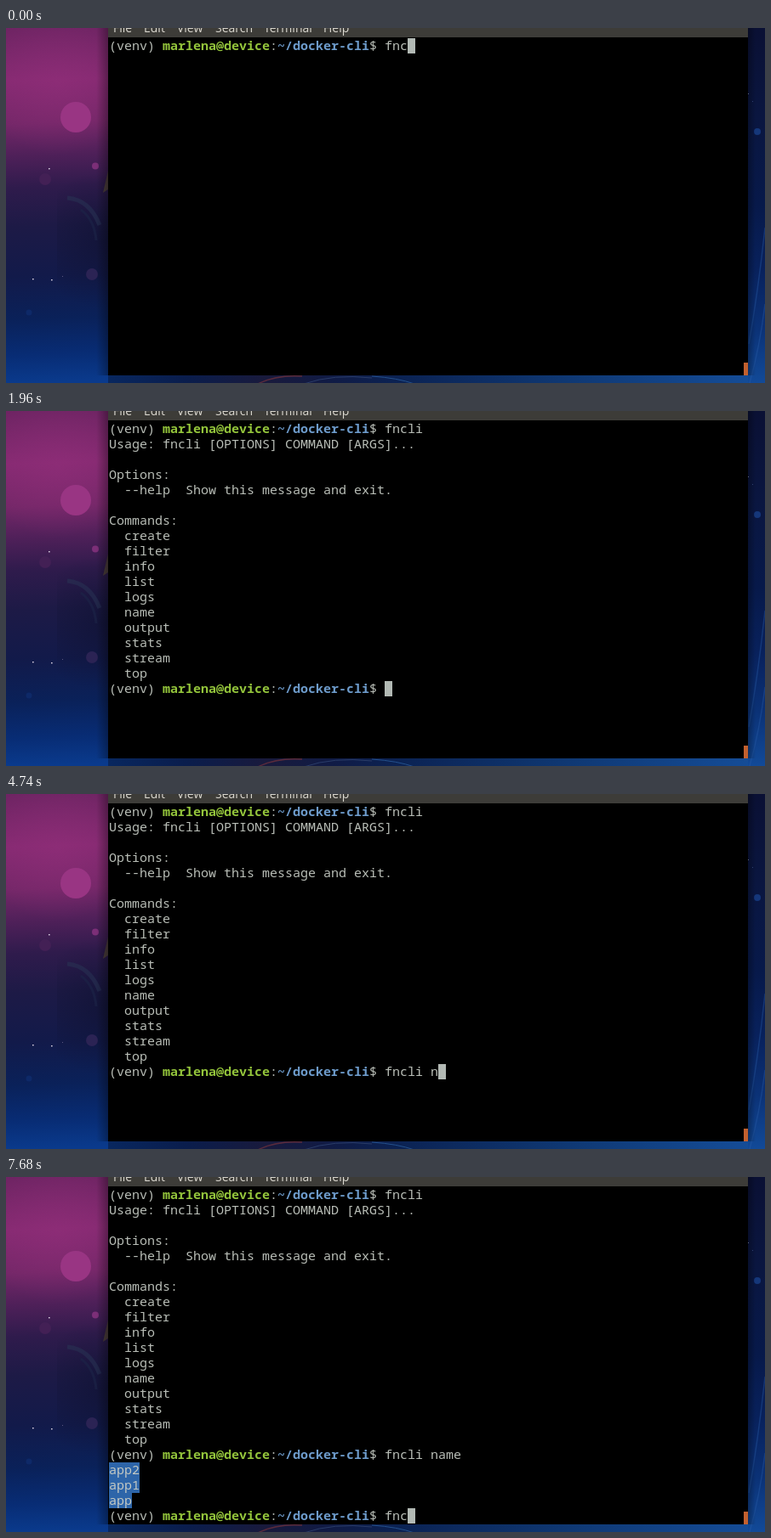
An HTML page with a canvas that plays this animation: 892 by 418 pixels, repeating every 8 s.

```html
<!DOCTYPE html>
<html lang="en">
<head>
<meta charset="utf-8">
<title>Terminal session</title>
<style>
  html, body { margin: 0; width: 100%; height: 100%; overflow: hidden; background: #000; }
  canvas { display: block; }
</style>
</head>
<body>
<canvas id="stage" width="892" height="418"></canvas>
<script>
const W = 892, H = 418, LOOP = 8000;
const LEFT = 121, TOP = 12, CELL = 9, LINE = 18;
const TEXT = '#b9beb7', GREEN = '#93c43b', BLUE = '#6d9bcb', CURSOR = '#b2b9b4';
const MONO = '15px "Noto Sans Mono", monospace';

const ctx = document.getElementById('stage').getContext('2d');

const HELP = [
  'Usage: fncli [OPTIONS] COMMAND [ARGS]...', '',
  'Options:', '  --help  Show this message and exit.', '',
  'Commands:',
  ...'create filter info list logs name output stats stream top'.split(' ').map(c => '  ' + c)
];
const APPS = ['app2', 'app1', 'app'];
const HELP_AT = 1190, APPS_AT = 6050;

const PROMPT = [
  ['(venv) ', TEXT], ['marlena@device', GREEN, true], [':', TEXT],
  ['~/docker-cli', BLUE, true], ['$ ', TEXT]
];
const PROMPT_LEN = PROMPT.reduce((n, part) => n + part[0].length, 0);

// Each prompt: row, time it appears, and the typed text from each time on
const PROMPTS = [
  { row: 0, at: 0, keys: [[0, 'fnc'], [180, 'fncli ']] },
  { row: 17, at: 1260, keys: [
    [2280, 'f'], [3310, 'fn'], [3540, 'fnc'], [3770, 'fncli '],
    [4730, 'fncli n'], [4800, 'fncli na'], [4880, 'fncli nam'], [5030, 'fncli name']] },
  { row: 21, at: 6120, keys: [[7360, 'f'], [7520, 'fn'], [7680, 'fnc']] }
];

// Cursor at the start of a row while a command runs: from, to, row
const WAITS = [[820, 1190, 1], [1190, 1260, 17], [5530, 6050, 18], [6050, 6120, 21]];
// Dark phases of the blinking cursor
const BLINKS = [[750, 820], [1370, 1960], [2850, 3240], [4340, 4660], [6120, 6690], [7290, 7360]];

const during = t => ([from, to]) => t >= from && t < to;

function rect(x, y, w, h, color) {
  ctx.fillStyle = color;
  ctx.fillRect(x, y, w, h);
}

function disc(x, y, r, color) {
  ctx.fillStyle = color;
  ctx.beginPath();
  ctx.arc(x, y, r, 0, Math.PI * 2);
  ctx.fill();
}

function gradient(x0, y0, x1, y1, stops) {
  const g = ctx.createLinearGradient(x0, y0, x1, y1);
  stops.forEach(([p, color]) => g.addColorStop(p, color));
  return g;
}

function glow(x, y, r, inner, outer) {
  const g = ctx.createRadialGradient(x, y, 0, x, y, r);
  g.addColorStop(0, inner);
  g.addColorStop(1, outer);
  return g;
}

function curve(color, width, x0, y0, cx, cy, x1, y1) {
  ctx.strokeStyle = color;
  ctx.lineWidth = width;
  ctx.beginPath();
  ctx.moveTo(x0, y0);
  ctx.quadraticCurveTo(cx, cy, x1, y1);
  ctx.stroke();
}

function drawWallpaper() {
  rect(0, 0, 120, H, gradient(0, 0, 14, H, [
    [0, '#6e2463'], [0.15, '#862a72'], [0.27, '#742768'], [0.36, '#4f2059'],
    [0.45, '#2f1b4c'], [0.56, '#1d1a46'], [0.7, '#121a4a'], [0.82, '#0a2159'],
    [0.92, '#082c74'], [1, '#0a3a8c']
  ]));
  rect(0, 0, 120, 180, glow(60, 65, 85, 'rgba(150,48,125,0.4)', 'rgba(150,48,125,0)'));
  rect(60, 170, 60, 180, glow(112, 250, 80, 'rgba(14,16,46,0.55)', 'rgba(14,16,46,0)'));

  // Dim plumes by the window edge
  curve('rgba(40,52,84,0.55)', 5, 72, 200, 98, 202, 110, 232);
  curve('rgba(28,36,72,0.6)', 3, 88, 214, 104, 226, 106, 250);
  ctx.fillStyle = '#4a3c3a';
  ctx.beginPath();
  ctx.moveTo(120, 168);
  ctx.lineTo(114, 194);
  ctx.lineTo(120, 190);
  ctx.fill();

  // Bottom and right edges
  rect(120, 409, 772, 9, gradient(120, 0, W, 0, [
    [0, '#08275f'], [0.12, '#0a1d4c'], [0.24, '#191a3c'], [0.34, '#101b45'],
    [0.45, '#0b2354'], [0.7, '#0f3873'], [1, '#154e9a']
  ]));
  rect(872, 0, 20, H, gradient(0, 0, 0, H, [
    [0, '#0a1034'], [0.25, '#0a1640'], [0.5, '#07194a'],
    [0.68, '#08215c'], [0.85, '#0b3277'], [1, '#124a98']
  ]));
  curve('#5a2b3c', 1.5, 296, 419, 318, 408, 348, 410);
  curve('#2a3c68', 1, 350, 419, 385, 407, 430, 412);
  curve('#24508c', 1, 430, 410, 460, 412, 480, 419);
  curve('rgba(40,90,165,0.4)', 1.5, 892, 235, 884, 310, 873, 372);
  curve('rgba(40,90,165,0.4)', 1.5, 892, 325, 886, 375, 874, 418);

  disc(82, 105, 18, '#993583');
  disc(105, 162.5, 4, '#7c2f78');
  disc(46, 178, 7, '#432055');
  disc(101, 290, 7, '#2b2354');
  disc(27, 335, 3.5, '#0e2968');
  disc(883, 122, 4, '#15377a');
  [[50, 165], [31, 295], [53, 296]].forEach(([x, y]) => rect(x, y, 1.6, 1.4, '#d8cfe0'));
  rect(66, 292, 1, 1, '#5b5680');
  rect(872, 77, 1, 1, '#8590b4');
  rect(877, 86, 1, 1, '#34477c');
}

function drawWindow() {
  rect(106, 0, 14, 409, gradient(106, 0, 120, 0, [[0, 'rgba(0,0,0,0)'], [1, 'rgba(0,0,0,0.32)']]));
  rect(872, 0, 9, 409, gradient(872, 0, 881, 0, [[0, 'rgba(0,0,0,0.3)'], [1, 'rgba(0,0,0,0)']]));
  rect(120, 0, 752, 409, '#000');
  rect(120, 0, 752, 11, '#3d3c38');
  ctx.font = '14px "Open Sans", sans-serif';
  ctx.fillStyle = '#dcd9d1';
  const menu = { File: 126, Edit: 162, View: 201, Search: 246, Terminal: 303, Help: 373 };
  for (const [label, x] of Object.entries(menu)) ctx.fillText(label, x, 5);
  rect(867, 394, 5, 15, '#c2602f');
}

function print(text, col, row, color = TEXT, bold = false) {
  ctx.font = (bold ? 'bold ' : '') + MONO;
  ctx.fillStyle = color;
  ctx.fillText(text, LEFT + col * CELL, TOP + row * LINE + 14);
}

function fillCells(col, row, count, color) {
  rect(LEFT + col * CELL, TOP + row * LINE, count * CELL, LINE, color);
}

function typedAt(prompt, t) {
  const done = prompt.keys.filter(([at]) => at <= t);
  return done.length ? done[done.length - 1][1] : '';
}

function drawPrompt(prompt, t) {
  let col = 0;
  for (const [text, color, bold] of PROMPT) {
    print(text, col, prompt.row, color, bold);
    col += text.length;
  }
  print(typedAt(prompt, t), col, prompt.row);
}

function drawCursor(t, prompt) {
  if (BLINKS.some(during(t))) return;
  const wait = WAITS.find(during(t));
  if (wait) fillCells(0, wait[2], 1, CURSOR);
  else fillCells(PROMPT_LEN + typedAt(prompt, t).length, prompt.row, 1, CURSOR);
}

function draw(t) {
  drawWallpaper();
  drawWindow();
  if (t >= HELP_AT) HELP.forEach((line, i) => print(line, 0, 1 + i));
  if (t >= APPS_AT) APPS.forEach((name, i) => {
    fillCells(0, 18 + i, name.length, '#2d65a9');
    print(name, 0, 18 + i, '#c3c9c4');
  });
  const shown = PROMPTS.filter(p => p.at <= t);
  shown.forEach(p => drawPrompt(p, t));
  drawCursor(t, shown[shown.length - 1]);
}

const start = performance.now();
function tick() {
  draw((performance.now() - start) % LOOP);
  requestAnimationFrame(tick);
}
tick();
</script>
</body>
</html>
```
